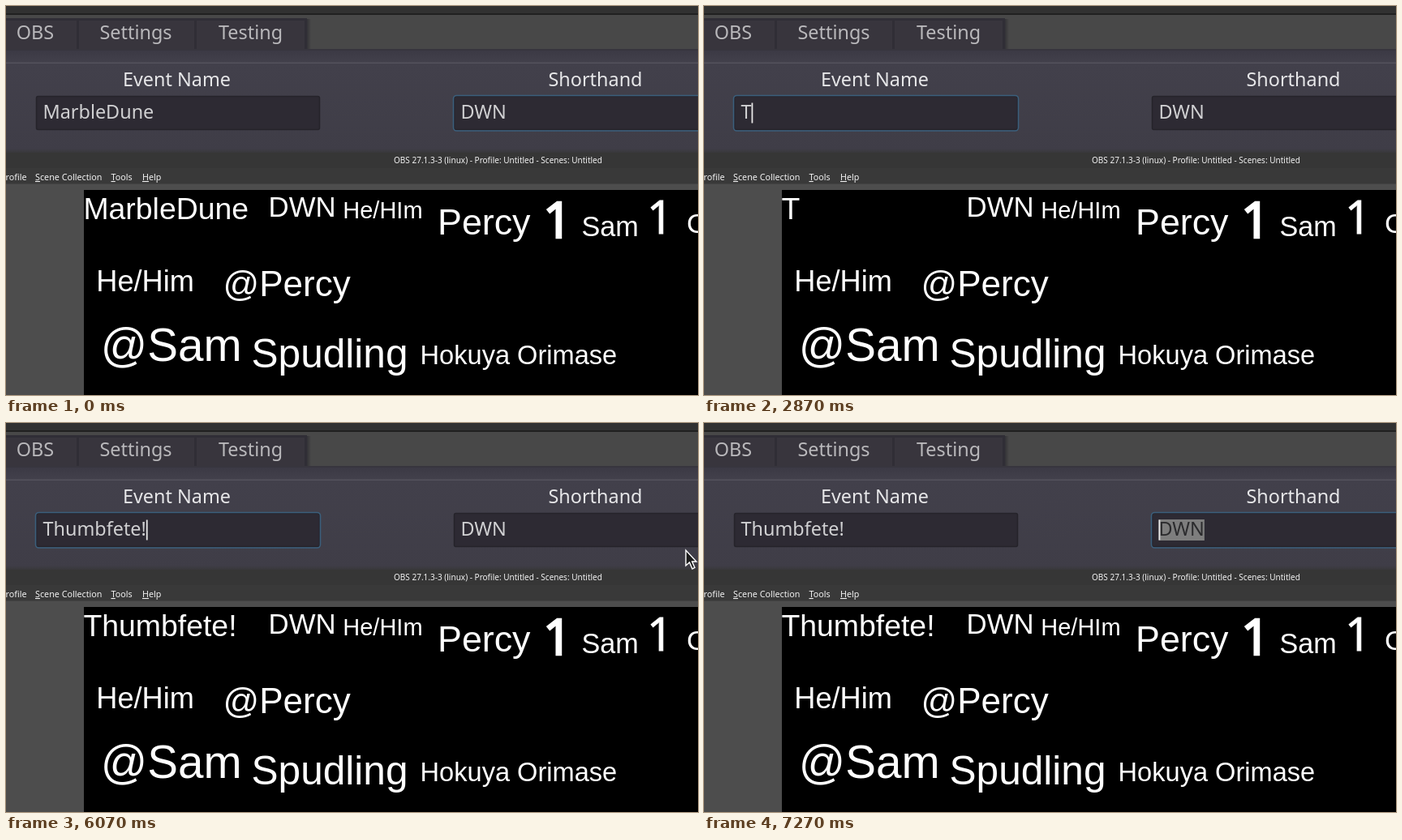
Recreate the animation shown at these times as an HTML page. Size 853 by 480 pixels, loop 8000 ms.

```html
<!DOCTYPE html>
<html lang="en">
<head>
<meta charset="utf-8">
<title>Event form and live scene</title>
<style>
  html, body { margin: 0; width: 100%; height: 100%; overflow: hidden; background: #4d4d4d; }
  svg { display: block; width: 853px; height: 480px; }
  text { white-space: pre; }
  .form { font: 23.4px "Noto Sans", "Open Sans", sans-serif; fill: #d0d0d2; filter: blur(.4px); }
  .mid { text-anchor: middle; }
  .tab { fill: #b9b8bb; }
  .label { fill: #e6e6e8; }
  .box { fill: #2d2a33; stroke: #25232a; stroke-width: 1.5; }
  .focus { fill: none; stroke: #3b5f7c; stroke-width: 1.6; }
  .sel { fill: #7e7e7e; }
  .caret { fill: #e6e6e6; }
  .picked { fill: #2b2b2d; }
  .bar { font: 10.75px "Noto Sans", "Open Sans", sans-serif; fill: #f2f2f2; }
  .title { font-size: 10.03px; }
  .key { text-decoration: underline; }
  .scene { font-family: "Liberation Sans", Arial, sans-serif; fill: #fff; }
  .count { font-family: "Noto Sans", sans-serif; stroke: #fff; }
  .halo { fill: none; stroke: #e4e4e4; stroke-width: 4.6; }
  .core { fill: none; stroke: #2a2a2c; stroke-width: 1.7; }
</style>
</head>
<body>
<svg viewBox="0 0 853 480" xmlns="http://www.w3.org/2000/svg">
  <defs>
    <linearGradient id="panel" x1="0" y1="0" x2="0" y2="1">
      <stop offset="0" stop-color="#3b3944"/>
      <stop offset=".13" stop-color="#42404b"/>
      <stop offset="1" stop-color="#3f3d47"/>
    </linearGradient>
    <linearGradient id="shade">
      <stop offset="0" stop-color="#2f2e33"/>
      <stop offset="1" stop-color="#484848"/>
    </linearGradient>
    <linearGradient id="foot" x1="0" y1="0" x2="0" y2="1">
      <stop offset="0" stop-color="#3f3d47"/>
      <stop offset="1" stop-color="#363636"/>
    </linearGradient>
  </defs>

  <g class="form">
    <rect x="-9" y="-9" width="880" height="192" fill="#484848"/>
    <rect x="-9" y="-9" width="880" height="19" fill="#313131"/>
    <rect x="-9" y="9" width="880" height="2" fill="#212121"/>
    <rect x="370" y="16" width="6" height="38" fill="url(#shade)"/>
    <rect x="-9" y="15" width="380" height="39" fill="#302e36"/>
    <path d="M-9 18H87V53H-9ZM90 18H232V53H90ZM235 18H368V53H235Z" fill="#38353d"/>
    <rect x="-9" y="53" width="880" height="130" fill="url(#panel)"/>
    <rect x="-9" y="53" width="880" height="2" fill="#37353e"/>
    <rect x="-9" y="69.5" width="880" height="1.5" fill="#54525d"/>
    <rect x="-9" y="176" width="880" height="7" fill="url(#foot)"/>
    <text class="mid tab" x="36" y="41">OBS</text>
    <text class="mid tab" x="160" y="41">Settings</text>
    <text class="mid tab" x="301.5" y="41">Testing</text>
    <text class="mid label" x="210.5" y="98.5">Event Name</text>
    <text class="mid label" x="726.5" y="98.5">Shorthand</text>
    <g id="event"></g>
    <g id="short"></g>
  </g>

  <rect y="181" width="853" height="39" fill="#363636"/>
  <rect y="200" width="853" height="20" fill="#393939"/>
  <rect y="219.5" width="853" height="261" fill="#4d4d4d"/>
  <g class="bar">
    <text class="title" x="478" y="194">OBS 27.1.3-3 (linux) - Profile: Untitled - Scenes: Untitled</text>
    <text x="-7" y="215">Profile</text>
    <text x="36" y="215"><tspan class="key">S</tspan>cene Collection</text>
    <text x="129.5" y="215"><tspan class="key">T</tspan>ools</text>
    <text x="168" y="215"><tspan class="key">H</tspan>elp</text>
  </g>
  <rect x="96" y="227" width="757" height="253"/>

  <g class="scene">
    <text id="live" x="95.4" y="262.7" font-size="37.4"></text>
    <text x="323.5" y="259.5" font-size="34.8">DWN</text>
    <text x="415.3" y="262" font-size="29">He/HIm</text>
    <text x="532" y="282" font-size="44.8">Percy</text>
    <text class="count" x="662" y="285.5" font-size="62" stroke-width="2.4">1</text>
    <text x="709.5" y="283.5" font-size="34.2">Sam</text>
    <text class="count" x="790" y="281" font-size="56" stroke-width=".8">1</text>
    <text x="839" y="280" font-size="34">C</text>
    <text x="111.3" y="352" font-size="36.2">He/Him</text>
    <text x="267.5" y="357.5" font-size="44">@Percy</text>
    <text x="116.8" y="437.5" font-size="56.6">@Sam</text>
    <text x="302.5" y="445.5" font-size="49.6">Spudling</text>
    <text x="510.6" y="442" font-size="32.6">Hokuya Orimase</text>
  </g>

  <g id="cursor">
    <g id="beam">
      <path class="halo" d="M-5.5 -12.5H5.5M0 -13V13M-5.5 12.5H5.5"/>
      <path class="core" d="M-4 -12.5H4M0 -12.5V12.5M-4 12.5H4"/>
    </g>
    <path id="arrow" d="M0 0V19L4.5 15L8 23L11 21.5L7.7 14H13Z" fill="#1c1c1c" stroke="#fff" stroke-width="1.4"/>
  </g>
</svg>

<script>
  const LOOP = 8000, LAG = 30;
  const OLD = 'MarbleDune', NEW = 'Thumbfete!';
  const KEYS = [2770, 2920, 3070, 3210, 3340, 3770, 3910, 4060, 4200, 4470];

  // Pointer trips: [ms, x, y]; the pointer is hidden between trips
  const TRIPS = [
    [[670, 548, 222], [760, 468, 166], [880, 330, 98], [1000, 236, 113],
     [1100, 216.5, 129], [1270, 216.5, 129], [1570, -15, 133]],
    [[6070, 838, 157], [6180, 829, 138], [6300, 825, 129], [6530, 825, 129], [6565, 773, 129],
     [6600, 773, 129], [6870, 311, 115], [7130, 311, 115], [7270, 298, 142]]
  ];

  const $ = id => document.getElementById(id);
  const within = (t, a, b) => t >= a && t < b;

  function pointer(t) {
    const trip = TRIPS.find(p => within(t, p[0][0], p[p.length - 1][0]));
    if (!trip) return null;
    const i = trip.findIndex(p => p[0] > t);
    const [t0, x0, y0] = trip[i - 1], [t1, x1, y1] = trip[i];
    const k = (t - t0) / (t1 - t0);
    return { x: x0 + (x1 - x0) * k, y: y0 + (y1 - y0) * k };
  }

  function makeField(id, x, w) {
    const g = $(id);
    g.innerHTML = `
      <rect class="box" x="${x}" y="111.5" width="${w}" height="41" rx="2"/>
      <rect class="focus" x="${x - 1}" y="110.5" width="${w + 2}" height="43.5" rx="4"/>
      <rect class="sel" y="119" height="26"/>
      <text x="${x + 8}" y="139"><tspan></tspan><tspan class="picked"></tspan></text>
      <rect class="caret" y="119.5" width="1.8" height="25"/>`;
    const [, focus, sel, text, caret] = g.children;
    const [plain, picked] = text.children;
    const left = x + 8;
    const edge = i => left + (i ? text.getSubStringLength(0, i) : 0);

    // from: pointer x of a drag selection, or null
    return (value, focused, showCaret, from) => {
      plain.textContent = value;
      picked.textContent = '';
      let at = value.length;
      if (from !== null) {
        while (at > 0 && (edge(at) + edge(at - 1)) / 2 > from) at--;
      }
      const a = edge(at), b = edge(value.length);
      plain.textContent = value.slice(0, at);
      picked.textContent = value.slice(at);
      sel.setAttribute('x', a);
      sel.setAttribute('width', b - a);
      caret.setAttribute('x', a);
      focus.style.display = focused ? '' : 'none';
      caret.style.display = showCaret ? '' : 'none';
    };
  }

  const eventField = makeField('event', 37.5, 349);
  const shortField = makeField('short', 552.5, 340);

  function typed(t) {
    const n = KEYS.filter(k => k <= t).length;
    return n ? NEW.slice(0, n) : OLD;
  }

  function overField(p) {
    return p.y > 111 && p.y < 153 && (within(p.x, 37, 387) || p.x > 552);
  }

  function draw(t) {
    const p = pointer(t);
    const onEvent = within(t, 1270, 6565), onShort = !onEvent;
    const dragX = p ? p.x : -20;
    eventField(typed(t), onEvent, onEvent, within(t, 1270, KEYS[0]) ? dragX : null);
    shortField('DWN', onShort, t >= 6565, t >= 6565 ? dragX : null);
    $('live').textContent = typed(t - LAG);

    $('cursor').style.display = p ? '' : 'none';
    if (!p) return;
    const beam = overField(p) || within(t, 1270, 1570) || t >= 6565;
    $('cursor').setAttribute('transform', `translate(${p.x} ${p.y})`);
    $('beam').style.display = beam ? '' : 'none';
    $('arrow').style.display = beam ? 'none' : '';
  }

  let start;
  function tick(now) {
    start ??= now;
    draw((now - start) % LOOP);
    requestAnimationFrame(tick);
  }
  draw(0);
  requestAnimationFrame(tick);
</script>
</body>
</html>
```
